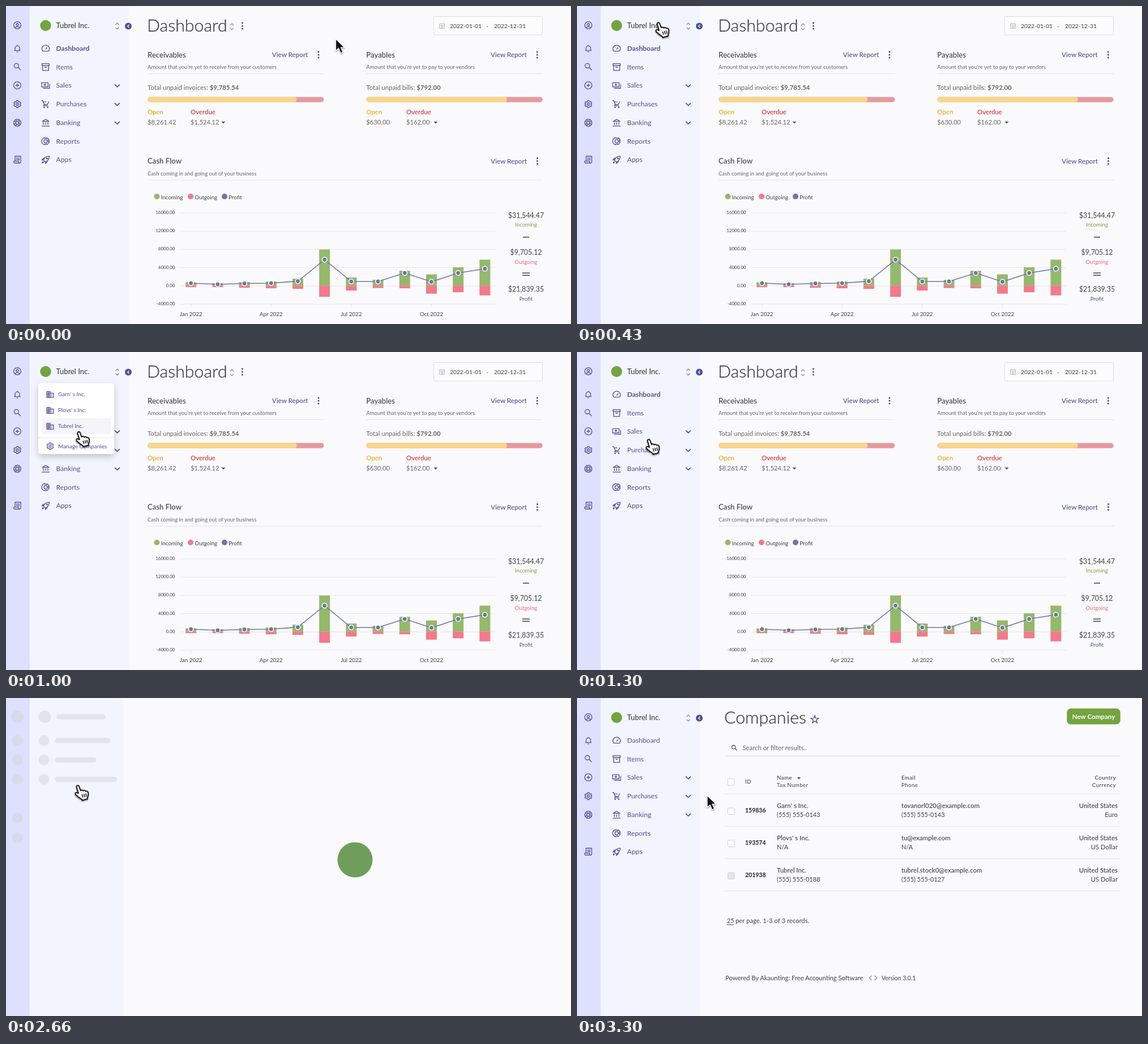
Animation, 998 px wide and 561 px high, one loop 3.33 s. Source, as an HTML page:

```html
<!DOCTYPE html>
<html lang="en">
<head>
<meta charset="utf-8">
<title>Accounting dashboard</title>
<style>
html, body { margin: 0; width: 100%; height: 100%; overflow: hidden; background: #fafafc; }
svg { display: block; width: 100%; height: 100%; }
text { font-family: Lato, "Open Sans", sans-serif; white-space: pre; }
</style>
</head>
<body>
<svg id="stage" viewBox="0 0 998 561"></svg>
<script>
const INK = '#424242', PURPLE = '#4f5190', GREEN = '#74a33f', RULE = '#e3e3e7';
const COMPANY = 'Tubrel Inc.', SECOND = "Garn' s Inc.", THIRD = "Plovs' s Inc.";

// Line icons on a 24 unit grid
const ring = (x, y, r) => `M${x - r} ${y}a${r} ${r} 0 1 0 ${2 * r} 0a${r} ${r} 0 1 0 ${-2 * r} 0`;
const ICONS = {
  user: ring(12, 12, 9.5) + ring(12, 10, 3) + 'M6 18.5c3-4 9-4 12 0',
  bell: 'M6 17v-6a6 6 0 0 1 12 0v6M3.5 17.5h17M12 2.5v2M10.5 21h3',
  search: ring(9.5, 9.5, 6) + 'M14 14l7 7',
  plus: ring(12, 12, 9.5) + 'M12 7.5v9M7.5 12h9',
  gear: ring(12, 12, 3) + 'M10 2.5h4l.5 3 2 1.2 2.7-1 2 3.5-2.2 1.8v2l2.2 1.8-2 3.5-2.7-1-2 1.2-.5 3h-4l-.5-3-2-1.2-2.7 1-2-3.5 2.2-1.8v-2L2.8 9.2l2-3.5 2.7 1 2-1.2z',
  help: ring(12, 12, 9.5) + ring(12, 12, 4) + 'M8 3.5l2 4.5M16 3.5l-2 4.5M8 20.5l2-4.5M16 20.5l-2-4.5M3.5 8l4.5 2M3.5 16l4.5-2M20.5 8l-4.5 2M20.5 16l-4.5-2',
  receipt: 'M6 15.500V3h15v15a3 3 0 0 1-3 3H5a2.5 2.5 0 0 1-2.500-2.500V16H15v2.5a2.5 2.5 0 0 0 3 2.5M9 8h9M9 12h9',
  speed: 'M4.5 19a10 9.5 0 1 1 15 0zM12 14.5l4-5.5',
  box: 'M2.5 3h19v5h-19zM4 8v13h16V8M9 12.5h6',
  cash: 'M1.5 4.5h17v11h-17zM5 19.5h17.5V8' + ring(10, 10, 2),
  cart: 'M1 2.5h3l4.5 10.5h8L20.5 5M8.5 13l-2 3.5H19M5 6h9' + ring(8, 20.5, 1) + ring(17.5, 20.5, 1),
  bank: 'M3 8.5l9-5.5 9 5.5zM6 11v7M12 11v7M18 11v7M1.5 21h21',
  pie: 'M11 2.5a9.5 9.5 0 0 0 0 19v-6a3.5 3.5 0 0 1 0-7zM14.5 3a9.5 9.5 0 0 1 7 7.5h-6l-1-1.5zM14.5 21a9.5 9.5 0 0 0 7-7.5h-6l-1 1.5z',
  rocket: 'M9.5 16.5l-3-3c1-6 6-10.5 15-11-.5 9-5 14-11 15zM7 11.5l-5 1.5 4-5 4-.5M12.5 17l-1.5 5 5-4 .5-4M3 21c0-3 1.5-4 2.5-3.5s1 3-2.5 3.5' + ring(15.5, 8.5, 1.5),
  building: 'M2.5 3.5h9.5v17H2.5zM12 8h9.5v12.5H12M2.5 8H12M2.5 12H12M2.5 16H12M7.2 3.5v17M15 12h3M15 16h3',
  calendar: 'M3 5h18v16H3zM3 10h18M7.5 2v3M16.5 2v3M7 14h10M7 17.5h10'
};

const icon = (name, x, y, size = 16, color = PURPLE) =>
  `<path transform="translate(${x - size / 2} ${y - size / 2}) scale(${size / 24})" d="${ICONS[name]}"
    fill="none" stroke="${color}" stroke-width="2" stroke-linejoin="round"/>`;
const text = (x, y, str, size, fill = INK, weight = 400, anchor = 'start', spacing = 0) =>
  `<text x="${x}" y="${y}" font-size="${size}" fill="${fill}" font-weight="${weight}" text-anchor="${anchor}" letter-spacing="${spacing}">${str}</text>`;
const rect = (x, y, w, h, fill, rx = 0, stroke = 'none') =>
  `<rect x="${x}" y="${y}" width="${w}" height="${h}" fill="${fill}" rx="${rx}" stroke="${stroke}"/>`;
const dot = (x, y, r, fill, stroke = 'none') =>
  `<circle cx="${x}" cy="${y}" r="${r}" fill="${fill}" stroke="${stroke}" stroke-width="1.5"/>`;
const line = (d, color = RULE, width = 1) =>
  `<path d="${d}" fill="none" stroke="${color}" stroke-width="${width}"/>`;
const pageTitle = (x, str) => `<g stroke="${INK}" stroke-width=".35">${text(x, 45, str, 30.3, INK, 300)}</g>`;
const kebab = (x, y) => [-5, 0, 5].map(dy => dot(x, y + dy, 1.6, PURPLE)).join('');
const unfold = (x, y) => line(`M${x - 3} ${y - 2.5}l3-3 3 3M${x - 3} ${y + 2.5}l3 3 3-3`, '#85858c', 1.2);
const caret = (x, y) => `<path d="M${x - 3.5} ${y - 1.7}h7l-3.5 3.7z" fill="#555"/>`;

function sidebar(active) {
  const rail = [['user', 34], ['bell', 75], ['search', 107], ['plus', 140], ['gear', 173], ['help', 206], ['receipt', 271]];
  const menu = [['speed', 'Dashboard'], ['box', 'Items'], ['cash', 'Sales'], ['cart', 'Purchases'],
    ['bank', 'Banking'], ['pie', 'Reports'], ['rocket', 'Apps']];
  return rect(42, 0, 175, 561, '#f2f5fd')
    + rail.map(([name, y]) => icon(name, 20, y)).join('')
    + dot(70, 34.5, 9.7, GREEN)
    + text(88.5, 39, COMPANY, 13, INK, 500)
    + unfold(196.5, 35.5) + dot(216, 35.5, 6, PURPLE) + line('M217.3 33l-2.5 2.5 2.5 2.5', '#fff', 1.3)
    + menu.map(([name, label], i) => {
      const y = 75 + i * 32.7;
      const chevron = i > 1 && i < 5 ? line(`M192 ${y - 2}l4.5 4.3 4.5-4.3`, PURPLE, 1.7) : '';
      return icon(name, 70, y) + text(88.5, y + 4, label, 12.2, PURPLE, label === active ? 700 : 400) + chevron;
    }).join('');
}

const heading = (x, right, y, title, subtitle) =>
  text(x, y + 4.5, title, 13.2, INK, 500)
  + text(right - 28, y + 4, 'View Report', 11.7, PURPLE, 500, 'end') + kebab(right - 9.5, y)
  + text(x, y + 25, subtitle, 9.5, '#666') + line(`M${x} ${y + 33.5}H${right}`);

function balance(x, title, subtitle, label, total, split, open, overdue, overdueX, caretX) {
  return heading(x, x + 311.5, 86, title, subtitle)
    + text(x, 147.5, `${label} <tspan font-weight="700">${total}</tspan>`, 11.4, '#666')
    + rect(x, 160.5, 311.5, 9.2, '#e59a9e', 4.6) + rect(x, 160.5, split - x, 9.2, '#f6d78c', 4.6)
    + text(x, 191, 'Open', 11.5, '#e5a50a') + text(overdueX, 191, 'Overdue', 11.5, '#cc2222')
    + text(x, 209, open, 11.2, '#666') + text(overdueX, 209, overdue, 11.2, '#666') + caret(caretX, 205.5);
}

function chart() {
  const bars = [ // top, bottom and profit heights per month
    [487.5, 496, 489], [489, 496, 491], [487, 497, 489.5], [486, 498, 489], [481, 499, 485.5], [429.5, 513, 447.5],
    [479, 502, 486], [483, 497.5, 486], [467, 498, 471], [473.5, 507.5, 486.5], [461, 505, 471], [447.5, 510.5, 463.5]];
  const monthX = i => 326.7 + 47.2 * i;
  const rows = [16000, 12000, 8000, 4000, 0, -4000].map((value, i) =>
    line(`M308 ${365 + i * 32.2}H864`, '#e6e6ec') + text(298.5, 367 + i * 32.2, value.toFixed(2), 8, INK, 400, 'end'));
  const legend = [['Incoming', 266.5, '#94b86c'], ['Outgoing', 326, '#f3798c'], ['Profit', 386, '#7173a8']];
  return rows.join('')
    + legend.map(([label, x, color]) => dot(x, 336, 5, color) + text(x + 7.3, 340.5, label, 9.7)).join('')
    + bars.map(([top, bottom], i) => rect(monthX(i) - 9.5, top, 19, 493.3 - top, '#94b86c')
      + rect(monthX(i) - 9.5, 493.3, 19, bottom - 493.3, '#f3798c')).join('')
    + line('M' + bars.map((b, i) => `${monthX(i)} ${b[2]}`).join('L'), '#7173a8', 1.6)
    + bars.map((b, i) => dot(monthX(i), b[2], 4.2, '#7173a8', '#fff')).join('')
    + ['Jan', 'Apr', 'Jul', 'Oct'].map((month, i) => line(`M${monthX(i * 3)} 526v4.5`)
      + text(monthX(i * 3), 546.5, month + ' 2022', 9.9, INK, 400, 'middle')).join('');
}

function dashboard() {
  const totals = [['$31,544.47', 'Incoming', GREEN], ['$9,705.12', 'Outgoing', '#f06880'], ['$21,839.35', 'Profit', PURPLE]];
  return sidebar('Dashboard')
    + pageTitle(249, 'Dashboard') + unfold(399, 36.5) + kebab(417.5, 35)
    + rect(755.5, 18.5, 192, 32.5, '#fcfcfd', 2, '#dddde2') + icon('calendar', 770, 35, 12, '#bbb')
    + text(784, 39, '2022-01-01', 10.4) + text(848, 39, '-', 10.4) + text(862, 39, '2022-12-31', 10.4)
    + balance(250, 'Receivables', "Amount that you're yet to receive from your customers",
      'Total unpaid invoices:', '$9,785.54', 513.5, '$8,261.42', '$1,524.12', 326, 384)
    + balance(636.3, 'Payables', "Amount that you're yet to pay to your vendors",
      'Total unpaid bills:', '$792.00', 885, '$630.00', '$162.00', 707, 759)
    + heading(250, 948, 273.5, 'Cash Flow', 'Cash coming in and going out of your business')
    + chart()
    + totals.map(([sum, label, color], i) => text(918.5, 373.5 + i * 65.3, sum, 12.4, INK, 400, 'middle')
      + text(918.5, 389 + i * 65.5, label, 9.7, color, 400, 'middle')).join('')
    + line('M913 407.7h11M912 471h13M912 475h13', INK, 1.6);
}

function dropdown() {
  return `<rect x="57" y="55" width="134" height="125" rx="5" fill="#fff" filter="url(#shadow)"/>`
    + '<rect id="hover" x="64" width="121" height="28" rx="4" fill="#f4f4f9"/>'
    + [SECOND, THIRD, COMPANY].map((name, i) => icon('building', 78, 75 + i * 28, 15)
      + text(92, 78.3 + i * 28, name, 9.9, PURPLE)).join('')
    + line('M57 151.5H191') + icon('gear', 78, 166, 15) + text(92, 169.5, 'Manage Companies', 10, PURPLE);
}

function skeleton() {
  const gray = '#d1d5db';
  const bar = (x, y, w) => rect(x, y - 4.7, w, 9.4, gray, 4.7);
  return rect(42, 0, 165, 561, '#f2f5fd') + '<g id="pulse">'
    + dot(20.3, 33, 11, gray) + [75, 109, 143.5, 212, 246.5].map(y => dot(20.3, y, 9.5, gray)).join('')
    + dot(68.3, 33, 11, gray) + bar(89, 33, 86.5)
    + [98, 74, 110].map((w, i) => dot(67, 75 + i * 34.3, 9.5, gray) + bar(86, 75 + i * 34.3, w)).join('')
    + '</g><circle id="loader" cx="616.5" cy="285.5" fill="#6f9e5c"/>';
}

function companies() {
  const rows = [
    ['159836', SECOND, '(555) 555-0143', 'tovanorl020@example.com', '(555) 555-0143', 'Euro'],
    ['193574', THIRD, 'N/A', 'tu@example.com', 'N/A', 'US Dollar'],
    ['201938', COMPANY, '(555) 555-0188', 'tubrel.stock0@example.com', '(555) 555-0127', 'US Dollar']];
  const checkbox = (y, fill = '#fff') => rect(266.5, y - 5.5, 11.5, 11.5, fill, 1, '#cfcfd8');
  const star = Array.from({ length: 10 }, (_, i) => {
    const r = i % 2 ? 2.9 : 7, a = i * Math.PI / 5;
    return `${420 + r * Math.sin(a)} ${38 - r * Math.cos(a)}`;
  }).join('L');
  const label = (x, y, str, weight, anchor) => text(x, y, str, 9.7, INK, weight, anchor, .4);
  return sidebar()
    + pageTitle(260, 'Companies') + line(`M${star}z`, PURPLE, 1.4)
    + rect(865.3, 18.6, 94.4, 28, GREEN, 7) + text(912.5, 37, 'New Company', 11.6, '#fff', 700, 'middle')
    + icon('search', 278, 88, 13, INK) + text(292.5, 91.5, 'Search or filter results..', 11.3, '#666')
    + line('M261 102.3H960', '#d6d6dc')
    + checkbox(148) + label(297, 150.5, 'ID', 500)
    + label(353, 144, 'Name', 500) + caret(392, 141.5) + label(353, 157, 'Tax Number', 400)
    + label(573, 144, 'Email', 500) + label(573, 157, 'Phone', 400)
    + label(952, 144, 'Country', 500, 'end') + label(952, 157, 'Currency', 400, 'end')
    + line('M261 169.3H960')
    + rows.map(([id, name, tax, email, phone, currency], i) => {
      const y = 198 + i * 57;
      return checkbox(y + 1.5, i === 2 ? '#e4e4ec' : '#fff') + text(297, y + 4, id, 10.5, '#222', 700)
        + text(353, y - 4, name, 11.5, INK, 500) + text(353, y + 12, tax, 11)
        + text(573, y - 4, email, 11.5, INK, 500) + text(573, y + 12, phone, 11)
        + text(955, y - 4, 'United States', 11.5, INK, 500, 'end') + text(955, y + 12, currency, 11.3, INK, 400, 'end')
        + line(`M261 ${y + 28.3}H960`);
    }).join('')
    + text(265, 396.5, '25', 10.6) + line('M265 400h12', INK) + text(280, 396.5, 'per page. 1-3 of 3 records.', 11.3)
    + text(262, 497.5, 'Powered By Akaunting: Free Accounting Software', 11.2)
    + line('M520.5 490l-4.5 4 4.5 4M525.5 490l4.5 4-4.5 4', '#888', 1.1) + text(538, 497.5, 'Version 3.0.1', 10.5);
}

const ARROW = `<path d="M0 0V21L5 16.5 8.8 25 12.6 23.3 8.9 15.2H15.5z" fill="#111" stroke="#fff" stroke-width="1.2"/>`;
const HAND = `<path d="M-1.3 2.5C-2.3-.8 1.8-1.8 3 1L5.8 8.3C7.5 6.8 9.8 7.2 10.5 8.8 12 7.5 14.2 8 14.8 9.6 16.8 8.800 18.600 9.800 19 11.800 19.600 15 19.200 18 17.800 20.500L18 23 8.500 25.500 7.500 23.500C4 21.500 0 18.500-3 15.500-4.800 13-2.500 11-.5 12L2 13z"
  fill="#fff" stroke="#1a1a1a" stroke-width="2" stroke-linejoin="round"/>` + line('M8.3 15l1.500 5.500M11.700 14.300l1.300 5.500M15 13.500l1 5.500', '#1a1a1a', 1.600);

const group = (id, content, attrs = '') => `<g id="${id}" ${attrs}>${content}</g>`;
stage.innerHTML = `<defs>
    <filter id="shadow" x="-30%" y="-30%" width="160%" height="170%"><feDropShadow dx="0" dy="5" stdDeviation="6" flood-color="#000" flood-opacity=".2"/></filter>
    <filter id="soft" x="-50%" y="-50%" width="200%" height="200%"><feDropShadow dx="0" dy="1.5" stdDeviation="1.2" flood-color="#000" flood-opacity=".45"/></filter>
  </defs>`
  + rect(0, 0, 998, 561, '#fafafc') + rect(0, 0, 42, 561, '#dee1fd')
  + group('dashboardView', dashboard()) + group('menuView', dropdown())
  + group('loadingView', skeleton()) + group('companiesView', companies())
  + group('cursor', group('arrow', ARROW) + group('hand', HAND), 'filter="url(#soft)"');

const $ = id => document.getElementById(id);
const show = (id, visible) => $(id).setAttribute('display', visible ? 'inline' : 'none');
const progress = (t, from, to) => Math.min(1, Math.max(0, (t - from) / (to - from)));
const ease = p => p < .5 ? 4 * p ** 3 : 1 - 4 * (1 - p) ** 3;

const LOOP = 3330;
const MOVES = [[100, 430, 143, 30], [700, 1130, 126, 155], [3070, 3300, 230, 172]];

function cursorAt(t) {
  let [x, y] = [582.5, 58];
  for (const [from, to, toX, toY] of MOVES) {
    const p = ease(progress(t, from, to));
    x += (toX - x) * p;
    y += (toY - y) * p;
  }
  return [x, y];
}

function draw(now) {
  const t = now % LOOP;
  const [x, y] = cursorAt(t);
  const isHand = x < 200;
  $('cursor').setAttribute('transform', `translate(${x} ${y})`);
  show('hand', isHand);
  show('arrow', !isHand);

  show('dashboardView', t < 2160);
  show('loadingView', t >= 2160 && t < 2700);
  show('companiesView', t >= 2700);

  const menuOpen = t >= 560 && t < 1300;
  const hoverY = [61, 89, 117, 152].find(top => y >= top && y < top + 28);
  show('menuView', menuOpen);
  $('menuView').setAttribute('opacity', .4 + .6 * progress(t, 560, 630));
  show('hover', menuOpen && hoverY !== undefined);
  $('hover').setAttribute('y', hoverY ?? 0);

  $('pulse').setAttribute('opacity', .75 + .25 * Math.cos((t - 2160) / 500 * Math.PI));
  $('loader').setAttribute('r', 31 * ease(progress(t, 2190, 2500)));
  requestAnimationFrame(draw);
}
requestAnimationFrame(draw);
</script>
</body>
</html>
```
